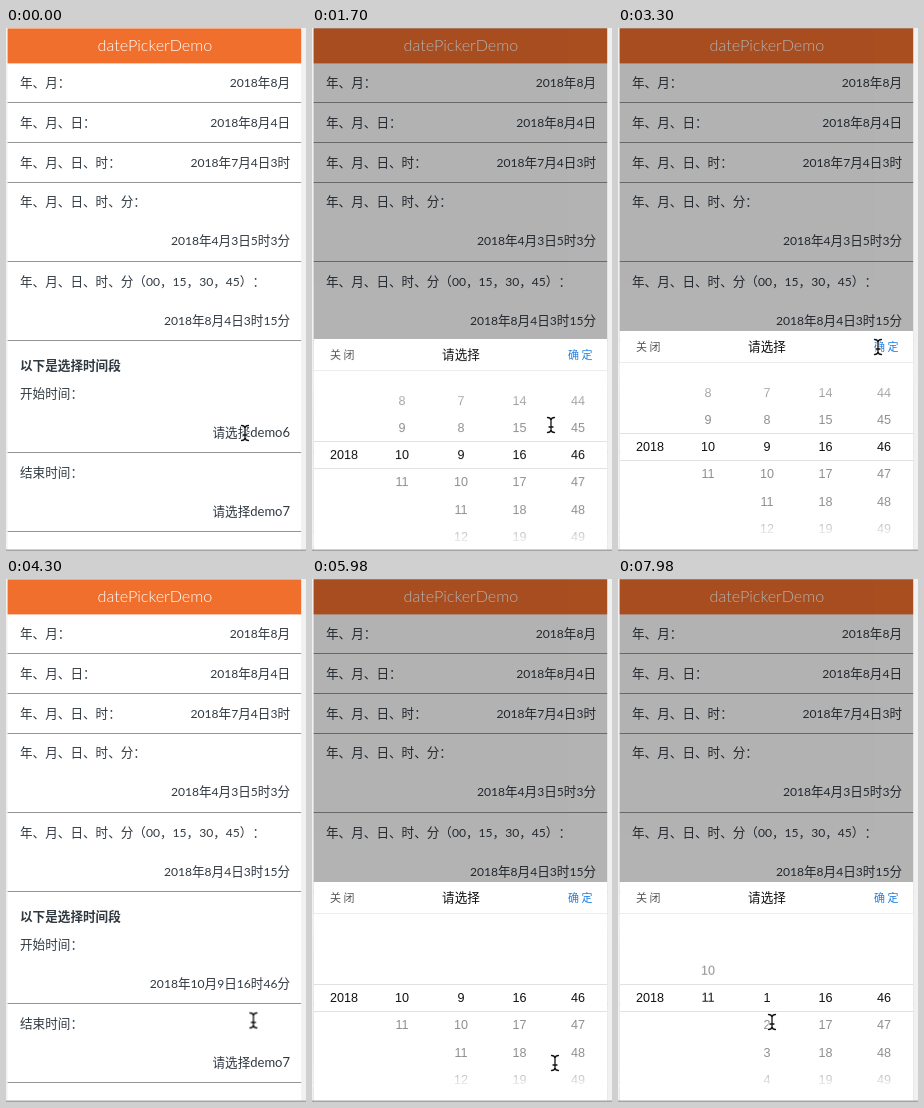
These frames come from a looping animation (300x523 px, 8000 ms). An HTML page:

```html
<!DOCTYPE html>
<html lang="zh-CN">
<head>
<meta charset="utf-8">
<title>datePickerDemo</title>
<style>
  html, body { margin: 0; width: 100%; height: 100%; overflow: hidden; background: #fff; }
  svg { display: block; width: 300px; height: 523px; overflow: hidden; }
  text {
    font: 12.6px "Noto Sans CJK SC", "Noto Sans CJK", sans-serif;
    fill: #303840; white-space: pre; text-spacing-trim: space-all;
  }
  .digits { font: 12.1px Lato, sans-serif; }
  .word { font: 13px Lato, sans-serif; }
  .title { font: 300 16.2px Lato, sans-serif; fill: #fff; }
  .bold { font-weight: 700; }
  .heading { fill: #111; }
  .close { font-size: 11px; fill: #555; }
  .ok { font-size: 11px; font-weight: 500; fill: #1b7fe3; }
  .num { font: 12.6px "Liberation Sans", Arial, sans-serif; fill: #8f8f8f; }
  .picked .num { fill: #111; }
</style>
</head>
<body>
<svg id="stage" viewBox="0 0 300 523">
  <defs>
    <linearGradient id="fadeDown" x1="0" y1="0" x2="0" y2="1">
      <stop offset="0" stop-color="#fff" stop-opacity="0"/>
      <stop offset="1" stop-color="#fff" stop-opacity=".95"/>
    </linearGradient>
    <linearGradient id="fadeUp" x1="0" y1="1" x2="0" y2="0">
      <stop offset="0" stop-color="#fff" stop-opacity="0"/>
      <stop offset="1" stop-color="#fff" stop-opacity=".95"/>
    </linearGradient>
    <clipPath id="wheel"><rect x="2" y="336" width="293" height="172"/></clipPath>
    <clipPath id="band"><rect x="2" y="406" width="293" height="26"/></clipPath>
  </defs>
</svg>
<script>
const LOOP = 8000, ROW = 27.3, MID = 418.7;
const LEFT = 1.6, WIDTH = 293.6;
const COLUMNS = [32, 90, 149, 207.5, 266];
const stage = document.getElementById('stage');

function add(parent, tag, attrs = {}) {
  const el = document.createElementNS('http://www.w3.org/2000/svg', tag);
  for (const key in attrs) el.setAttribute(key, attrs[key]);
  return parent.appendChild(el);
}
const rect = (parent, x, y, width, height, fill) => add(parent, 'rect', { x, y, width, height, fill });
const strip = (parent, y, height, fill) => rect(parent, LEFT, y, WIDTH, height, fill);

// Latin runs get their own face inside the Chinese text.
function label(parent, str, x, y, anchor = 'start', cls = '') {
  const el = add(parent, 'text', { x, y: y + 4.4, 'text-anchor': anchor, class: cls });
  for (const run of str.match(/[\x21-\x7e]+|[^\x21-\x7e]+/g)) {
    const face = /[a-z]/i.test(run) ? 'word' : /\d/.test(run) ? 'digits' : '';
    add(el, 'tspan', face && !cls ? { class: face } : {}).textContent = run;
  }
  return el;
}

function play(el, prop, steps) {
  el.animate(steps.map(([t, value, easing = 'linear']) => ({ offset: t / LOOP, [prop]: value, easing })),
    { duration: LOOP, iterations: Infinity });
}
function show(el, from, to) {
  const steps = [[0, from > 0 ? 0 : 1]];
  if (from > 0) steps.push([from, 0], [from, 1]);
  if (to < LOOP) steps.push([to, 1], [to, 0]);
  steps.push([LOOP, to < LOOP ? 0 : 1]);
  play(el, 'opacity', steps);
}

// Page
rect(stage, 0, 0, 300, 523, '#f1f1f1');
strip(stage, 0, 522, '#fff');
strip(stage, 0.4, 35, '#f06f2d');
label(stage, 'datePickerDemo', 149, 18.3, 'middle', 'title');
for (const y of [74, 114, 154, 233, 312, 424, 503]) strip(stage, y, 1, '#959595');

[['年、月：', 54.5], ['年、月、日：', 94.5], ['年、月、日、时：', 134.5], ['年、月、日、时、分：', 174],
 ['年、月、日、时、分（00，15，30，45）：', 253.5], ['开始时间：', 365.5], ['结束时间：', 444.5]]
  .forEach(([str, y]) => label(stage, str, 14, y));
label(stage, '以下是选择时间段', 14, 337.5, 'start', 'bold');
[['2018年8月', 54.5], ['2018年8月4日', 94.5], ['2018年7月4日3时', 134.5], ['2018年4月3日5时3分', 213],
 ['2018年8月4日3时15分', 292.5], ['请选择demo7', 483.5]]
  .forEach(([str, y]) => label(stage, str, 284, y, 'end'));
show(label(stage, '请选择demo6', 284, 405, 'end'), 0, 3420);
show(label(stage, '2018年10月9日16时46分', 284, 405, 'end'), 3420, LOOP);

const shade = strip(stage, 0, 522, '#000');
play(shade, 'opacity', [[0, 0], [1460, 0], [1640, .3], [3420, .3], [3680, 0], [5475, 0], [5650, .3], [LOOP, .3]]);

// Picker sheet
const sheet = add(stage, 'g');
strip(sheet, 303, 221, '#fff');
const columns = add(sheet, 'g', { 'clip-path': 'url(#wheel)' });
const picked = add(sheet, 'g', { 'clip-path': 'url(#band)', class: 'picked' });
strip(picked, 406, 26, '#fff');

// Each wheel is drawn twice: grey everywhere, dark within the selected band.
function wheel(col, first, last, value, from, to, motion) {
  for (const layer of [columns, picked]) {
    const holder = add(layer, 'g'), list = add(holder, 'g');
    for (let n = first; n <= last; n++)
      add(list, 'text', { x: COLUMNS[col], y: MID + (n - value) * ROW + 4.4, 'text-anchor': 'middle', class: 'num' })
        .textContent = n;
    show(holder, from, to);
    if (motion) play(list, 'transform', motion);
  }
}
const shift = y => `translate(0px, ${y}px)`;

const SWAP = 4500, DAY_RESET = 7540;
wheel(0, 2018, 2018, 2018, 0, LOOP);
wheel(1, 8, 11, 10, 0, SWAP);
wheel(2, 7, 12, 9, 0, SWAP);
wheel(3, 14, 19, 16, 0, SWAP);
wheel(4, 44, 49, 46, 0, SWAP);
wheel(1, 10, 11, 10, SWAP, LOOP, [[0, shift(0)], [7050, shift(0), 'ease-in-out'],
  [7350, shift(-25), 'ease-out'], [7480, shift(-ROW)], [LOOP, shift(-ROW)]]);
wheel(2, 9, 12, 9, SWAP, DAY_RESET);
wheel(2, 1, 4, 1, DAY_RESET, LOOP);
wheel(3, 16, 19, 16, SWAP, LOOP);
wheel(4, 46, 49, 46, SWAP, LOOP);

strip(sheet, 336, 38, 'url(#fadeUp)');
strip(sheet, 484, 25, 'url(#fadeDown)');
strip(sheet, 334, 1, '#ececec');
for (const y of [405, 432]) strip(sheet, y, 1, '#e2e2e2');
label(sheet, '关 闭', 18, 318.5, 'start', 'close');
label(sheet, '请选择', 149, 318.5, 'middle', 'heading');
label(sheet, '确 定', 280.5, 318.5, 'end', 'ok');

play(sheet, 'transform', [[0, shift(222)], [1473, shift(222), 'ease'], [1773, shift(0)],
  [3420, shift(0), 'ease'], [3720, shift(222)], [5470, shift(222), 'ease'], [5745, shift(0)], [LOOP, shift(0)]]);

rect(stage, 0, 521.5, 300, 1.5, '#a5a5a5');

// Text cursor
const cursor = add(stage, 'g', { fill: 'none', 'stroke-linecap': 'round' });
for (const [stroke, width] of [['#fff', 3], ['#111', 1.3]])
  add(cursor, 'path', {
    d: 'M-3.5-7.5Q-.5-7.5 0-5Q.5-7.5 3.5-7.5M0-5V5M-3.5 7.5Q-.5 7.5 0 5Q.5 7.5 3.5 7.5M-2 2H2',
    stroke, 'stroke-width': width
  });
play(cursor, 'transform', [
  [0, 239, 405], [400, 239, 405], [900, 239, 397], [2500, 239, 397], [3100, 260, 319], [3750, 260, 319],
  [4600, 243, 484], [6030, 243, 484], [6540, 90, 446], [7050, 90, 446], [7350, 90, 421], [7500, 90, 421],
  [7850, 154, 443], [LOOP, 154, 443]
].map(([t, x, y]) => [t, `translate(${x}px, ${y}px)`, 'ease-in-out']));
</script>
</body>
</html>
```
